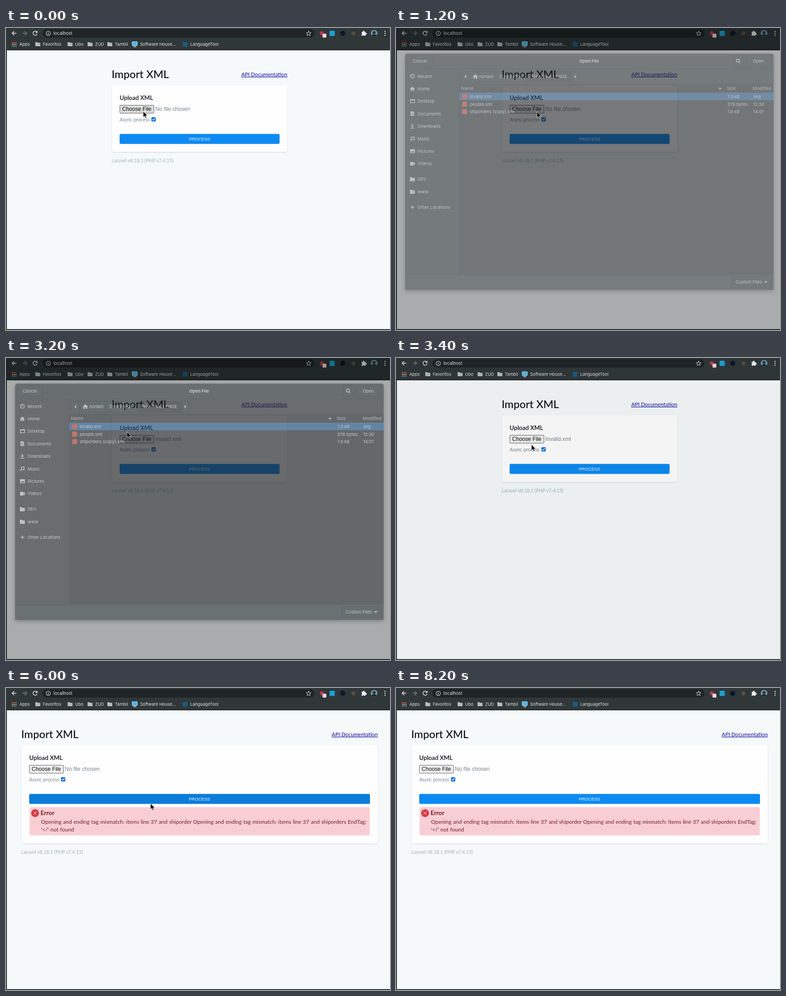
An HTML page that plays this animation: 845x663 px, repeating every 8.7 s.

```html
<!DOCTYPE html>
<html lang="en">
<head>
<meta charset="utf-8">
<title>Import XML</title>
<style>
  html, body { margin: 0; width: 100%; height: 100%; overflow: hidden; background: #f5f9fa; }
  svg { display: block; }
  text { font: 9.6px Inter, "Noto Sans", sans-serif; fill: #e4e6e6; white-space: pre; }
  .page text { font-family: Lato, "Open Sans", sans-serif; fill: #0b0f14; }
  .page .input { font: 12.1px "Liberation Sans", Arial, sans-serif; }
  .page .title { font-size: 23.7px; font-weight: 500; }
  .page .link { font-size: 11.7px; fill: #0b0b9c; text-decoration: underline; text-anchor: end; }
  .page .head { font-size: 13.3px; font-weight: 600; }
  .page .gray { fill: #75838f; }
  .page .small { font-size: 10.5px; }
  .page .pale { fill: #a0b2b6; }
  .page .error { font-size: 12px; word-spacing: .4px; fill: #721c24; }
  .page .process { font: 9.65px "Liberation Sans", Arial, sans-serif; fill: #f4f9ff; text-anchor: middle; }
  .marks text { font-size: 9.4px; }
  .mid { text-anchor: middle; }
  .bold { font-weight: 700; }
  .col { fill: #9a9f9f; font-weight: 600; }
  .btn { fill: #2a3132; stroke: #191e1f; }
  .icon { fill: none; stroke: #e4e6e6; stroke-width: 1.5; }
  .solid { fill: #d8dada; }
</style>
</head>
<body>
<svg width="845" height="663" viewBox="0 0 845 663">
  <defs>
    <path id="folder" d="M0 1Q0 0 1 0H4L5.500 1.500H10Q11 1.500 11 2.500V8Q11 9 10 9H1Q0 9 0 8Z"/>
    <filter id="soft" x="-10%" y="-10%" width="120%" height="125%">
      <feDropShadow dx="0" dy="1" stdDeviation="1" flood-opacity=".16"/>
    </filter>
    <filter id="deep" x="-10%" y="-10%" width="120%" height="125%">
      <feDropShadow dx="0" dy="3" stdDeviation="5" flood-opacity=".5"/>
    </filter>
  </defs>
  <rect width="845" height="663" fill="#f5f9fa"/>

  <g class="page">
    <rect id="card" y="126" rx="5" fill="#fffefe" filter="url(#soft)"/>
    <g id="form">
      <text class="title" x="232.500" y="110">Import XML</text>
      <text class="head" x="250" y="157.500">Upload XML</text>
      <rect id="choose" x="250.500" y="169.500" width="75" height="17.500" rx="1.500" stroke="#5c5c5c"/>
      <text class="input" x="255.500" y="182">Choose File</text>
      <text class="input gray" id="file" x="328.500" y="182"></text>
      <text class="gray small" x="250" y="205">Async process</text>
      <rect x="320" y="195.700" width="9.500" height="9.500" rx="1.700" fill="#0b70d4"/>
      <path d="M322 200.500L324 202.500L327.700 198" fill="none" stroke="#fff" stroke-width="1.400"/>
    </g>
    <text class="link" id="link" y="106">API Documentation</text>
    <rect id="process" y="232.500" height="22" rx="3"/>
    <text class="process" x="425.700" y="247">PROCESS</text>
    <g id="alert">
      <rect x="52" y="261.500" width="748.500" height="62" rx="3" fill="#f8ced4"/>
      <circle cx="64" cy="274.700" r="8.600" fill="#d43c46"/>
      <path d="M60.300 271L67.700 278.400M67.700 271L60.300 278.400" stroke="#fbdfe2"/>
      <text class="head" style="fill:#721c24;font-weight:700;font-size:13.600px" x="76" y="279">Error</text>
      <text class="error" x="77" y="297.700">Opening and ending tag mismatch: items line 37 and shiporder Opening and ending tag mismatch: items line 37 and shiporders EndTag:</text>
      <text class="error" x="77" y="314.800">'&lt;/' not found</text>
    </g>
    <text class="small pale" id="version">Laravel v8.18.1 (PHP v7.4.13)</text>
  </g>

  <g id="status">
    <path d="M0 645H279.500Q282.500 645 282.500 648V663H0Z" fill="#2c3436"/>
    <text x="6" y="657" style="font-size:9.500px">Processing request...</text>
  </g>

  <path d="M0 0H845V49H2V661H845V663H0Z" fill="#2f3739"/>
  <path d="M2 48.500H845" stroke="#15191a"/>
  <rect x="80" y="2.500" width="599" height="18.500" rx="9.250" fill="#1f2426"/>
  <path class="icon" d="M23 11.500H13.500M18 7L13.500 11.500L18 16"/>
  <path class="icon" d="M36 11.500H45.500M41 7L45.500 11.500L41 16" opacity=".4"/>
  <path class="icon" id="reload" d="M67.500 8.500A4.500 4.500 0 1 0 68.300 13M68.500 6.500V10H65"/>
  <path class="icon" id="stop" d="M60 7.500L68 15.500M68 7.500L60 15.500"/>
  <circle class="icon" cx="93" cy="11.700" r="4.700" style="stroke-width:1.100"/>
  <path class="icon" d="M93 11V14.500M93 8.800V10" style="stroke-width:1.200"/>
  <text x="104.500" y="15" style="font-size:9.700px">localhost</text>
  <path class="icon" style="stroke-width:1" d="M666 6.500L667.400 10.200L671.300 10.400L668.300 12.900L669.300 16.700L666 14.500L662.700 16.700L663.700 12.900L660.700 10.400L664.600 10.200Z"/>
  <circle cx="695" cy="11.500" r="4.500" fill="#b23a55"/>
  <rect x="696.500" y="12.500" width="8.500" height="8.500" rx="1.500" fill="#fbd5da"/>
  <rect x="712" y="6" width="11.500" height="11.500" rx="1.500" fill="#1aa0d4"/>
  <circle cx="741" cy="11.700" r="5.700" fill="#0c1726"/>
  <circle cx="764.500" cy="11.700" r="4.500" fill="#5a4d40"/>
  <path fill="#eceeee" d="M782.500 8.500H785.500A1.800 1.800 0 1 1 788.800 8.500H791.300V11A1.800 1.800 0 1 1 791.300 14.200V17H788.300A1.700 1.700 0 0 0 785.200 17H782.500V14A1.600 1.600 0 0 0 782.500 11Z"/>
  <circle cx="810" cy="11.500" r="7.300" fill="#6d98aa"/>
  <path d="M804 16Q810 11.500 816 16Q810 21 804 16Z" fill="#1d272d"/>
  <circle cx="810" cy="10" r="3.300" fill="#2b3034"/>
  <g fill="#eceeee"><circle cx="834" cy="7.500" r="1.200"/><circle cx="834" cy="11.700" r="1.200"/><circle cx="834" cy="16" r="1.200"/></g>
  <g class="marks" id="marks">
    <rect x="277.500" y="30" width="11.500" height="8.500" rx="1" fill="#45b8ee" stroke="#d5e3e8"/>
    <path d="M281 40H285.500M279.500 41.300H287" stroke="#d5e3e8"/>
    <rect x="389" y="30.500" width="10.500" height="10.500" fill="#1c5b80"/>
  </g>

  <rect id="shade" width="845" height="663"/>

  <g id="dialog">
    <path d="M20 62Q20 56 26 56H825Q831 56 831 62V575H20Z" fill="#212729" filter="url(#deep)"/>
    <path d="M20 89V62Q20 56 26 56H825Q831 56 831 62V89Z" fill="#2b3234"/>
    <path d="M26 56.500H825" stroke="#3e4648"/>
    <rect x="20" y="90" width="118" height="451" fill="#2a3032"/>
    <rect x="139" y="90" width="692" height="33" fill="#2a3032"/>
    <rect x="20" y="541" width="811" height="34" fill="#2f3638"/>
    <path d="M20 89.500H831M138.500 90V541M139 123.500H831M20 541.500H831M723.500 124V142M780.500 124V142" stroke="#191e1f" fill="none"/>
    <path d="M139 141.500H831M20 315.500H138M20 376.500H138" stroke="#262c2e"/>
    <g class="btn">
      <rect x="25" y="60.500" width="55.500" height="24.500" rx="3"/>
      <rect x="741.500" y="60.500" width="24" height="24.500" rx="3"/>
      <rect x="770.500" y="60.500" width="55.500" height="24.500" rx="3"/>
      <rect x="143.500" y="95.500" width="260" height="23.500" rx="3"/>
      <rect x="288.500" y="95.500" width="98" height="23.500" fill="#212729"/>
      <rect x="739.500" y="545.500" width="87" height="24.500" rx="3"/>
      <path d="M162.500 95.500V119M219.500 95.500V119"/>
    </g>
    <circle class="icon" cx="752.300" cy="71.500" r="3.300"/><path class="icon" d="M754.700 74L757.500 77"/>
    <path class="solid" d="M154.500 103V110.500L150.500 106.700ZM393 103V110.500L397 106.700ZM709.500 131.500H716.500L713 135.500ZM810 556H817.500L813.700 560ZM169 107L174.700 101.500L180.500 107H179V111.500H176V108H173.500V111.500H170.500V107Z"/>
    <text class="mid" x="52.500" y="76">Cancel</text>
    <text class="mid bold" x="425" y="76" style="font-size:9.500px">Open File</text>
    <text class="mid" x="797.500" y="76">Open</text>
    <text x="183" y="110">norlam</text>
    <text class="mid" x="253" y="110">Downloads</text>
    <text class="mid" x="337" y="110">PHP CHALLENGE</text>
    <text class="col" x="143" y="136">Name</text>
    <text class="col" x="728" y="136">Size</text>
    <text class="col" x="785" y="136">Modified</text>
    <text x="747" y="561">Custom Files</text>
    <rect id="select" x="139" width="692" height="16.600" fill="#215d9c"/>
    <g id="files"></g>
    <g id="places">
      <circle class="icon" cx="36" cy="106" r="4.300"/><path class="icon" d="M36 106.500L34 104.200" style="stroke-width:1.200"/>
      <path class="solid" d="M30.500 134L36 128.500L41.500 134H40V138.500H37.300V135H34.700V138.500H32V134Z"/>
      <path class="solid" d="M31 156.500H41.500V165H31ZM32.500 159V163.500H40V159Z" fill-rule="evenodd"/>
      <path class="solid" d="M32 183H37.500L40 185.500V193H32ZM33.500 187H38.500V188H33.500ZM33.500 189.500H38.500V190.500H33.500Z" fill-rule="evenodd"/>
      <path class="solid" d="M35 210.500H37V214.500H39.500L36 218L32.500 214.500H35ZM31.500 219H40.500V220.500H31.500Z"/>
      <path class="icon" d="M34 246V239.500H40V245"/><path class="solid" d="M31 246a1.800 1.800 0 1 0 3.600 0a1.800 1.800 0 1 0-3.600 0M37 245a1.800 1.800 0 1 0 3.600 0a1.800 1.800 0 1 0-3.600 0"/>
      <path class="solid" d="M31 266H41.500V275H31ZM32.500 273.500H40L37.500 269.500L35.700 272L34.500 271Z" fill-rule="evenodd"/>
      <path class="solid" d="M31 294H38V296.500L41.500 294.500V301.500L38 299.500V302H31Z"/>
      <use class="solid" href="#folder" x="30.500" y="327.500"/><use class="solid" href="#folder" x="30.500" y="355"/>
      <path class="icon" d="M32 393.500H40M36 389.500V397.500"/>
    </g>
  </g>
  <path id="cursor" d="M0 0V13L3 10.300L5 15L7.300 14L5.300 9.600H9.500Z" fill="#0a0a0a" stroke="#e8e8e8" stroke-width=".8"/>
</svg>
<script>
const $ = id => document.getElementById(id);
const set = (id, attrs) => { for (const k in attrs) $(id).setAttribute(k, attrs[k]); };
const show = (id, on) => set(id, { visibility: on ? "visible" : "hidden" });
const add = (id, markup) => $(id).insertAdjacentHTML("beforeend", markup);
const label = (x, y, s) => `<text x="${x}" y="${y}">${s}</text>`;

// Bookmarks bar
for (let i = 0; i < 9; i++) {
  const color = ["#e2574c", "#e8b23a", "#4c9be8"][(i / 3) | 0];
  add("marks", `<rect x="${13 + i % 3 * 3.8}" y="${31 + (i / 3 | 0) * 3.8}" width="2.4" height="2.4" fill="${color}"/>`);
}
for (const [x, s] of [[29.5, "Apps"], [295, "Software House..."], [405.5, "LanguageTool"]]) add("marks", label(x, 39, s));
for (const [x, s] of [[81, "Favoritos"], [152, "Ubo"], [196, "ZUD"], [239.5, "Tambil"]])
  add("marks", `<use href="#folder" x="${x - 16.5}" y="31" fill="#b9bbbb"/>` + label(x, 39, s));

// File chooser
const places = ["Recent", "Home", "Desktop", "Documents", "Downloads", "Music", "Pictures", "Videos", "DEV", "www", "Other Locations"];
places.forEach((s, i) => add("places", label(47.5, 109.5 + i * 27.4 + (i > 7) * 6.5 + (i > 9) * 6.5, s)));
[["invalid.xml", "1.3 kB", "seg"], ["people.xml", "576 bytes", "12:30"], ["shiporders (copy).xml", "1.6 kB", "14:01"]]
  .forEach(([name, size, date], i) => {
    const y = 153.8 + i * 16.7;
    add("files", `<rect x="145.5" y="${y - 9}" width="11" height="11" rx="1.5" fill="#d8432f"/>`
      + label(162, y, name) + label(729.5, y, size) + label(786, y, date));
  });

// Tracks: [time, value, ...], linear between points
const pointer = [
  [0, 302, 183], [800, 302, 183], [900, 310, 189], [1100, 310, 189], [1400, 310, 173], [1600, 310, 173],
  [1800, 286, 166], [1900, 286, 166], [2000, 282, 165], [2100, 282, 165], [2200, 270, 183], [2600, 250, 148],
  [3100, 250, 148], [3400, 298, 190], [3600, 316, 213], [3700, 316, 213], [4100, 420, 238], [4700, 420, 238],
  [5000, 423, 201], [5600, 423, 201], [6400, 213, 306], [6500, 213, 306], [6700, 190, 295], [6800, 200, 300],
  [6900, 200, 300], [7300, 210, 265], [7800, 90, 38], [7900, 72, 35]
];
const shade = [[800, 0], [900, .13], [1000, .25], [1200, .31], [3200, .31], [3300, .14], [3400, .04], [3600, 0]];
const fade = [[1100, 0], [1200, .4], [1400, 1], [3100, 1], [3200, .5], [3300, 0]];

function at(track, t) {
  const i = track.findIndex(p => p[0] > t);
  if (i < 0) return track[track.length - 1].slice(1);
  if (i === 0) return track[0].slice(1);
  const a = track[i - 1], b = track[i], k = (t - a[0]) / (b[0] - a[0]);
  return a.slice(1).map((v, j) => v + (b[j + 1] - v) * k);
}

function draw(now) {
  const t = Math.floor(now % 8700 / 100) * 100;
  const wide = t >= 4800, shift = wide ? 199 : 0;
  const left = 250 - shift, right = 602 + shift;
  const [x, y] = at(pointer, t);
  const hover = y > 232 && y < 255 && x > left && x < right;

  set("card", { x: 233 - shift, width: 386 + 2 * shift, height: wide ? 215.5 : 146 });
  set("form", { transform: `translate(${-shift})` });
  set("link", { x: 619 + shift });
  set("process", { x: left, width: right - left, fill: hover ? "#0c7cda" : "#0d8af2" });
  set("version", { x: 232.5 - shift, y: wide ? 364 : 295 });
  set("choose", { fill: t < 1200 ? "#dddddd" : "#efefef" });
  $("file").textContent = t >= 3200 && !wide ? "invalid.xml" : "No file chosen";
  show("alert", wide);
  show("status", t >= 4300 && t < 5700);

  const loading = t >= 4300 && t < 4800;
  show("reload", !loading);
  show("stop", loading);

  set("shade", { opacity: at(shade, t)[0] });
  set("dialog", { opacity: at(fade, t)[0] });
  set("select", { y: t >= 1700 && t < 2400 ? 158.6 : 142 });
  set("cursor", { transform: `translate(${x} ${y})` });
  show("cursor", t < 8000);
}

const start = performance.now();
function tick() {
  draw(performance.now() - start);
  requestAnimationFrame(tick);
}
tick();
</script>
</body>
</html>
```
